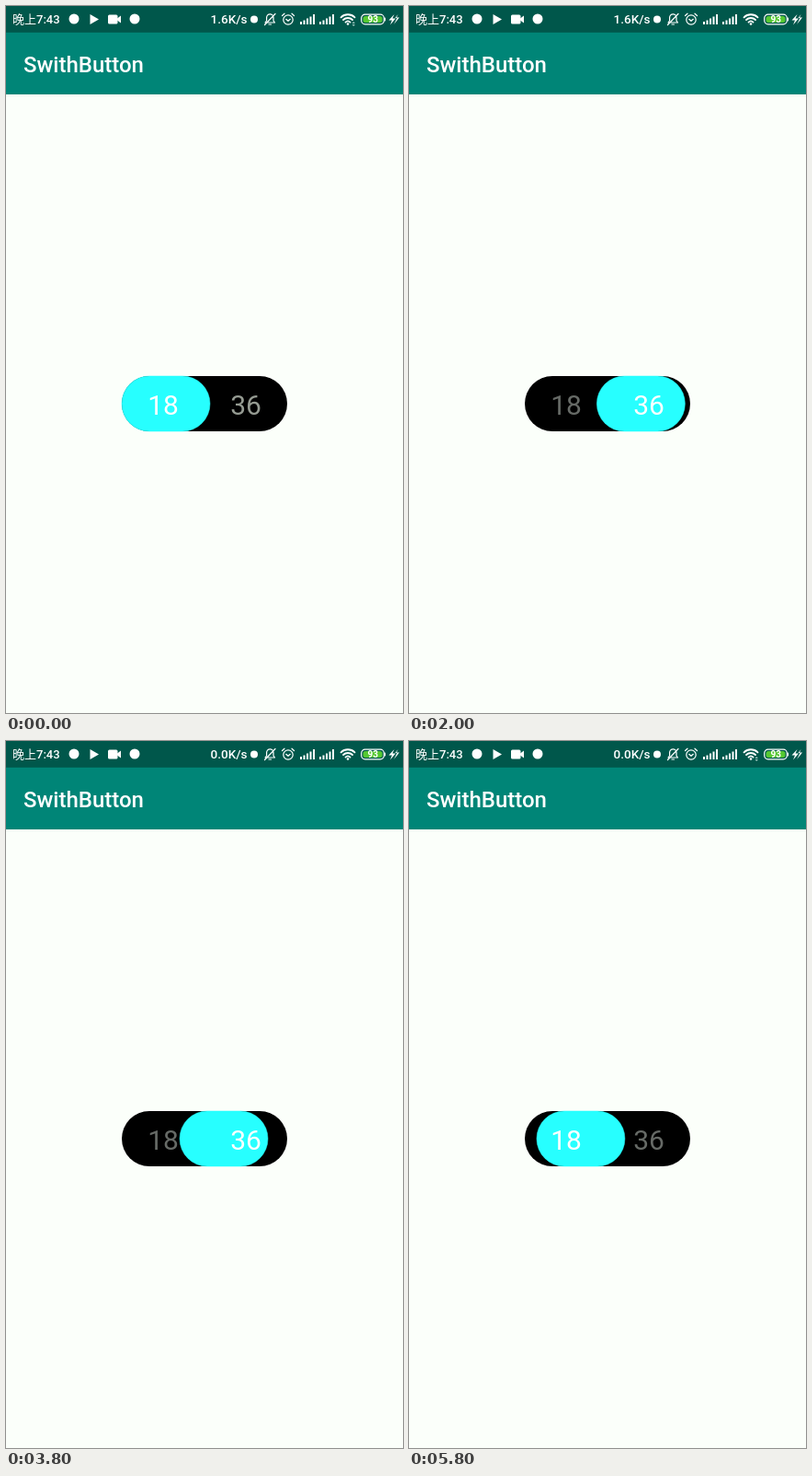
These frames come from a looping animation (432x768 px, 5900 ms). An HTML page:

```html
<!DOCTYPE html>
<html lang="en">
<head>
<meta charset="utf-8">
<title>SwithButton</title>
<style>
  html, body { margin: 0; width: 100%; height: 100%; overflow: hidden; background: #fbfffa; }
  svg { display: block; width: 432px; height: 768px; }
  .status { font: 500 13px Roboto, "Noto Sans CJK SC", "Noto Sans CJK", sans-serif; fill: #fff; }
  .title { font: 500 24px Roboto, sans-serif; fill: #fff; }
  .label { font: 400 30px Roboto, sans-serif; text-anchor: middle; }
  .line { fill: none; stroke: #fff; stroke-width: 1.2; stroke-linecap: round; stroke-linejoin: round; }
</style>
</head>
<body>
<svg viewBox="0 0 432 768">
  <defs>
    <linearGradient id="shade" x2="0" y2="1">
      <stop stop-color="#000" stop-opacity=".06"/>
      <stop offset="1" stop-color="#000" stop-opacity="0"/>
    </linearGradient>
    <path id="bars" d="M0 17h2v3h-2zM3.5 15.5h2v4.5h-2zM7 13.5h2v6.5h-2zM10.5 11.5h2v8.500h-2zM14 9h2v11h-2z"/>
  </defs>

  <rect width="432" height="768" fill="#fbfffa"/>
  <rect y="96" width="432" height="3" fill="url(#shade)"/>
  <rect width="432" height="96" fill="#008577"/>
  <rect width="432" height="28.8" fill="#00574b"/>

  <g class="status">
    <text x="7" y="19">晚上7:43</text>
    <circle cx="74" cy="14" r="5.5"/>
    <path d="M91.5 9v11l9.5-5.5z"/>
    <rect x="111" y="9.5" width="10.5" height="10" rx="1.5"/>
    <path d="M121 13.5l4-3v8l-4-3z"/>
    <circle cx="140" cy="14" r="5.5"/>
    <text id="speed" x="262.5" y="19" text-anchor="end" font-size="13.5">1.6K/s</text>
    <circle cx="270" cy="14.5" r="4"/>

    <g class="line">
      <path d="M282 18h10.5l-1.5-2v-3.5a3.700 3.700 0 0 0-7.400 0v3.500zM286 20h2.500M293 8.500l-11.500 12"/>
      <circle cx="307" cy="15" r="5.2"/>
      <path d="M300.5 10.5l2.500-2.300M313.500 10.500l-2.500-2.300M304.700 14.300l2.300 2 2.300-2"/>
      <path d="M364.5 12.3a10.800 10.800 0 0 1 15 0M367 15a7.200 7.200 0 0 1 10 0M369.500 17.600a3.600 3.600 0 0 1 5 0" stroke-width="1.8"/>
      <rect x="386.7" y="9.2" width="24.6" height="10.600" rx="4"/>
    </g>
    <use href="#bars" x="320"/>
    <use href="#bars" x="341"/>
    <circle cx="372" cy="19.5" r="1.3"/>
    <path id="traffic" d="M376.5 19l1.700-2 1.700 2zM376.500 20l1.700 2 1.700-2z" fill="#9cc5bd"/>
    <rect x="388.5" y="11" width="21" height="7" rx="2.5" fill="#55c832"/>
    <rect x="411.5" y="12.5" width="1.5" height="4" rx=".7"/>
    <text x="399.3" y="18.2" text-anchor="middle" font-size="10" font-weight="700">93</text>
    <path d="M422.5 9l-6 6.500h3.500l-2 5 6-7h-3.500zM426.500 9l-3 4h2l-3.500 7 6-7.500h-3z"/>
  </g>

  <text class="title" x="19" y="71.8">SwithButton</text>

  <rect x="126" y="402" width="180" height="60" rx="30"/>
  <rect id="knob" x="126" y="402" width="96" height="60" rx="30" fill="#27ffff" stroke="#27ffff" stroke-width=".5"/>
  <text id="left" class="label" x="171" y="444">18</text>
  <text id="right" class="label" x="261" y="444">36</text>
</svg>
<script>
  const LOOP = 5900, STEP = 100, SLIDE = 600;
  const START = 126, TRAVEL = 84;
  // Times at which the knob sets off, alternately right and left.
  const departures = [1500, 2700, 3400, 4056, 5646];
  const [speed, traffic, knob, left, right] =
    ["speed", "traffic", "knob", "left", "right"].map(id => document.getElementById(id));

  function ease(u) {
    const p = Math.min(1, Math.max(0, u));
    return (1 - Math.cos(Math.PI * p)) / 2;
  }

  function position(t) {
    return departures.reduce((sum, start, i) =>
      sum + (i % 2 ? -1 : 1) * ease((t - start) / SLIDE), 0);
  }

  function draw(now) {
    const t = Math.floor(now % LOOP / STEP) * STEP;
    const p = position(t);
    const onRight = p > 0.501;
    const idle = t < departures[0] ? "#959b92" : "#666a66";
    knob.setAttribute("x", START + TRAVEL * p);
    left.setAttribute("fill", onRight ? idle : "#fff");
    right.setAttribute("fill", onRight ? "#fff" : idle);
    speed.textContent = t < 3400 ? "1.6K/s" : "0.0K/s";
    traffic.style.display = t < 400 || t >= 4200 ? "" : "none";
  }

  const origin = performance.now();
  function tick() {
    draw(performance.now() - origin);
    requestAnimationFrame(tick);
  }
  tick();
</script>
</body>
</html>
```
